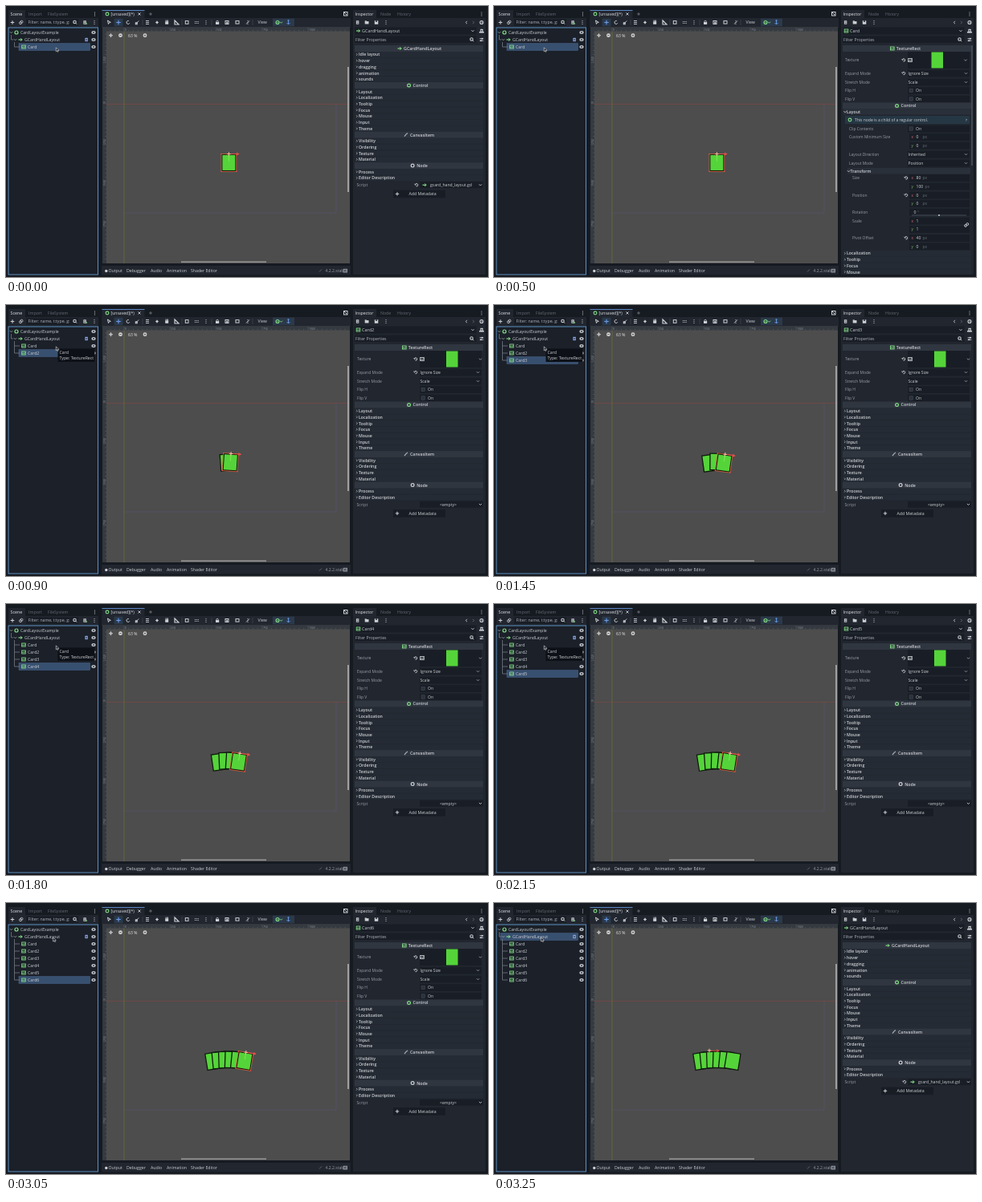
An HTML page with a canvas for the animation above (3.3 s loop, 600 by 338 pixels).

```html
<!DOCTYPE html>
<html lang="en">
<head>
<meta charset="utf-8">
<style>
html, body { margin: 0; width: 100%; height: 100%; overflow: hidden; background: #171b22; }
canvas { display: block; }
</style>
</head>
<body>
<canvas id="stage" width="600" height="338"></canvas>
<script>
const g = document.getElementById('stage').getContext('2d');
const LOOP = 3300;
const LIGHT = '#cdd0d4', DIM = '#9a9fa7', FAINT = '#666c76', GREEN = '#55d43a', LIME = '#83dc85',
      BLUE = '#699ce8', RED = '#f0504c', PANEL = '#21262f', FIELD = '#191e26', BAR = '#303640', SEL = '#385070';

function box(x, y, w, h, fill, stroke) {
  if (fill) { g.fillStyle = fill; g.fillRect(x, y, w, h); }
  if (stroke) { g.strokeStyle = stroke; g.strokeRect(x, y, w, h); }
}
function text(s, x, y, color = LIGHT, size = 5.2, weight = 400, align = 'left') {
  g.font = `${weight} ${size}px "Open Sans", "Noto Sans", sans-serif`;
  g.textAlign = align;
  g.textBaseline = 'alphabetic';
  g.fillStyle = color;
  g.fillText(s, x, y + 1.9);
}
function path(points, color, width = 0.9, closed) {
  g.beginPath();
  for (let i = 0; i < points.length; i += 2) g.lineTo(points[i], points[i + 1]);
  if (closed) g.closePath();
  g.strokeStyle = color; g.lineWidth = width; g.stroke(); g.lineWidth = 1;
}
function ring(x, y, r, color, width = 1.1) {
  g.beginPath(); g.arc(x, y, r, 0, 7);
  g.strokeStyle = color; g.lineWidth = width; g.stroke(); g.lineWidth = 1;
}
function dot(x, y, r, color) { g.beginPath(); g.arc(x, y, r, 0, 7); g.fillStyle = color; g.fill(); }
function plus(x, y, r, color, width = 1) {
  path([x - r, y, x + r, y], color, width);
  path([x, y - r, x, y + r], color, width);
}
const chevron = (x, y, c = LIGHT) => path([x - 1.6, y - .8, x, y + .8, x + 1.6, y - .8], c);
const more = (x, y, c = LIGHT) => path([x - .6, y - 1.2, x + .6, y, x - .6, y + 1.2], c, .7);
const cross = (x, y) => { path([x - 1.5, y - 1.5, x + 1.5, y + 1.5], LIGHT); path([x + 1.5, y - 1.5, x - 1.5, y + 1.5], LIGHT); };
const arrow = (x, y, c = LIME) => { path([x - 2.5, y, x + 2, y], c, 1.2); path([x, y - 1.6, x + 2.3, y, x, y + 1.6], c); };
const dots = (x, y, c = LIGHT) => [-2, 0, 2].forEach(d => dot(x, y + d, .6, c));
const revert = (x, y) => {
  g.beginPath(); g.arc(x, y, 1.7, -2.8, 1.8); g.strokeStyle = LIGHT; g.stroke();
  path([x - 2.5, y - 1.5, x - 1.5, y + .2, x, y - .6], LIGHT, .7);
};
function lens(x, y) { ring(x - .5, y - .5, 1.7, LIGHT); path([x + .7, y + .7, x + 2.3, y + 2.3], LIGHT); }
function eye(x, y) {
  g.beginPath(); g.ellipse(x, y, 2.7, 1.9, 0, 0, 7); g.fillStyle = '#c5c9cf'; g.fill();
  dot(x, y, 1, '#39414e');
}
function picture(x, y, c = LIME) {
  g.lineWidth = .9; box(x - 2.3, y - 2, 4.6, 4, null, c); g.lineWidth = 1;
  path([x - 2, y + 1.3, x - .5, y - .3, x + .5, y + .7, x + 2, y - .6], c, 1);
}
function sheet(x, y, c = LIGHT) { box(x - 1.6, y - 2.2, 3.4, 4.4, c); box(x - .7, y - 1, 1.7, .7, PANEL); box(x - .7, y + .5, 1.7, .7, PANEL); }
function folder(x, y) { box(x - 2.3, y - 1.4, 4.8, 3.4, LIGHT); box(x - 2.3, y - 2.1, 2.1, 1, LIGHT); }
function sliders(x, y) {
  path([x - 2.3, y - 1.3, x + 2.3, y - 1.3], LIGHT); path([x - 2.3, y + 1.3, x + 2.3, y + 1.3], LIGHT);
  dot(x + .8, y - 1.3, 1, LIGHT); dot(x - .8, y + 1.3, 1, LIGHT);
}

function sceneDock(state, t) {
  box(3, 15, 112, 320, PANEL);
  box(3, 5, 21, 10, PANEL);
  text('Scene', 5.5, 10, '#e6e7e9', 5.3);
  text('Import', 28, 10, FAINT, 5.3);
  text('FileSystem', 52, 10, FAINT, 5.1);
  dots(110.5, 10);
  plus(8, 20.5, 2.3, LIGHT);
  ring(18, 21.2, 1.5, LIGHT, .8); ring(19.5, 19.7, 1.5, LIGHT, .8);
  box(25, 16.5, 65, 8.5, FIELD);
  text('Filter: name, t:type, g:', 27.5, 20.5, '#b0b4bb', 5.2);
  lens(86, 20.5); sheet(98, 20.5); plus(100, 22, 1.2, LIME, .7); dots(110, 20.5);
  box(3, 27, 111.5, 308, '#1b2029', '#5d8fc0');
  const last = 42 + 9 * state.count;
  const selY = state.root ? 42 : 42 + 9 * state.selected, selX = state.root ? 8 : 16;
  g.lineWidth = .5; box(selX, selY - 4.3, 104.5 - selX, 8.6, SEL, '#4c6b92'); g.lineWidth = 1;
  chevron(6.5, 33, DIM); ring(13, 33, 2, LIME, 1.2);
  text('CardLayoutExample', 18, 33, LIGHT, 5.1); eye(109, 33);
  chevron(11.5, 42, DIM); arrow(18, 42);
  text('GCardHandLayout', 23, 42, LIGHT, 5.15); sheet(100, 42, '#8aa9e8'); eye(109, 42);
  path([6.5, 36, 6.5, 42, 9, 42], '#747a84', .8);
  path([10.5, 45, 10.5, last], '#747a84', .8);
  for (let i = 1; i <= state.count; i++) {
    const y = 42 + 9 * i;
    path([10.5, y, 17, y], '#747a84', .8);
    picture(22, y); text('Card' + (i > 1 ? i : ''), 27, y, LIGHT, 5.2); eye(109, y);
  }
  if (t > 740 && t < 2960) {
    box(64.5, 54.5, 46, 16.5, '#0d1117');
    text('Card', 66.5, 59, LIGHT, 5.2); text('Type: TextureRect', 66.5, 66, LIGHT, 5.2);
  }
}

function toolbar() {
  box(119, 15, 310, 12, PANEL); box(119.5, 5, 53, 10, PANEL);
  box(119.5, 5, 53, .8, BLUE);
  ring(126, 10, 1.9, LIME); text('[unsaved](*)', 130.5, 10, '#e0e2e5', 5.1);
  cross(166, 10); plus(180, 10, 1.9, FAINT);
  path([420.8, 7.8, 424.6, 11.6], LIGHT); box(420.5, 7.5, 4.5, 4.5, null, LIGHT);
  box(134.5, 15.7, 11, 9.6, '#2b394a'); box(332, 15.7, 27, 9.6, '#2b394a');
  path([126.5, 18, 127.5, 22.5, 128.5, 20.8, 130.3, 20.4], LIGHT, 1, true);
  plus(140, 20.5, 2.8, BLUE, 1.1);
  g.beginPath(); g.arc(152, 20.5, 2, .4, 5.2); g.strokeStyle = LIGHT; g.stroke();
  path([161.5, 22.3, 165.3, 18.5], LIGHT); box(161.3, 20.8, 2, 2, null, LIGHT);
  path([170, 17, 170, 24], '#3b414b');
  for (let d = -2; d <= 2; d += 2) path([174, 20.5 + d, 178, 20.5 + d], LIGHT);
  plus(188, 20.5, 2, LIGHT, .8); ring(188, 20.5, .8, LIGHT);
  box(198.2, 19.5, 4, 3.3, LIGHT); for (let i = 0; i < 3; i++) path([199 + i * 1.3, 20, 199 + i * 1.3, 17.5], LIGHT, .8);
  path([210, 18, 210, 23, 215, 23], LIGHT, 1.2, true);
  path([219, 17, 219, 24], '#3b414b');
  box(223.3, 18.6, 3.7, 3.7, null, LIGHT);
  for (let i = 0; i < 6; i++) dot(235.5 + i % 3 * 1.9, 19.5 + (i / 3 | 0) * 2, .6, LIGHT);
  dots(249, 20.5);
  path([256, 17, 256, 24], '#3b414b');
  box(261, 20, 4.2, 3, LIGHT); ring(263.1, 19.6, 1.3, LIGHT, .8);
  box(273, 18.5, 4, 4, null, LIGHT); box(274.2, 19.8, 2, 2, LIGHT);
  box(286, 18.6, 4, 3.5, null, LIGHT); dots(301, 20.5); path([299, 22.5, 303, 18.5], LIGHT);
  path([307, 17, 307, 24], '#3b414b');
  text('View', 313.5, 20.5, LIGHT, 5.2);
  ring(338, 20.5, 2, LIME); dot(338, 20.5, .7, LIME); chevron(342.5, 20.5, LIME);
  path([351.5, 18, 351.5, 23], BLUE); path([349.5, 21, 351.5, 23, 353.5, 21], BLUE); ring(351.5, 18.2, .8, BLUE, .7);
}

// Fan spacing and tilt of the outermost card, by hand size
const SPACING = [0, 0, 10.8, 10.4, 9.6, 9, 8.5], TILT = [0, 0, 8, 8, 8.5, 9, 9.3];
function pose(i, n) {
  if (n < 2) return [0, 0, 0];
  const mid = (n - 1) / 2, u = (i - mid) / mid;
  return [(i - mid) * SPACING[n], u * u * 1.7, u * TILT[n]];
}
function cards(state) {
  const p = Math.min(1, state.age / 250), e = 1 - (1 - p) * (1 - p), n = state.count;
  for (let i = 0; i < n; i++) {
    const to = pose(i, n), from = n > 1 ? pose(Math.min(i, n - 2), n - 1) : to;
    const [dx, dy, a] = to.map((v, k) => from[k] + (v - from[k]) * e);
    g.save();
    g.translate(277.4 + dx, 184.6 + dy); g.rotate(a * Math.PI / 180);
    g.lineWidth = 1.3;
    box(-8.6, .6, 17.2, 20.4, GREEN, '#101a0e');
    if (!state.root && i === n - 1) {
      g.lineWidth = .7; box(-9.4, -.2, 18.8, 22, null, '#e8623f');
      g.lineWidth = 1;
      for (const [x, y] of [[-9.4, 0], [9.4, 0], [9.4, 21.6], [-9.4, 21.6]]) dot(x, y, .7, RED);
      path([0, 0, 9, 0], RED, .8); path([0, 0, 0, 9], '#8cec5c', .7);
      path([9.5, -1.4, 12, 0, 9.5, 1.4], RED, 1.2);
      plus(0, 0, 2.4, '#ffc4ae', .9);
    }
    g.restore();
  }
  if (state.root) {
    path([268, 184.3, 277, 184.3], RED, .8); path([277, 183, 279.5, 184.3, 277, 185.6], RED, 1.2);
    plus(268, 184, 2.3, '#ffc4ae', .9);
  }
}

function viewport(state) {
  box(120, 26.5, 308, 294.5, '#4d4d4d');
  path([147, 258, 411, 258, 411, 122], '#57556d', .7);
  path([125, 122.5, 428, 122.5], '#754846', .8);
  path([147, 31, 147, 321], '#66703f', .8);
  box(120, 26.5, 308, 5, '#353a41'); box(120, 26.5, 5, 294.5, '#353a41');
  for (let i = 0; i < 60; i++) {
    const x = 129.8 + i * 5.73, y = 35 + i * 5.1;
    if (x < 427) path([x, i % 10 === 3 ? 27 : 29.8, x, 31.5], '#626870', .5);
    if (y < 320) path([i % 10 === 7 ? 120.5 : 123.3, y, 125, y], '#626870', .5);
  }
  [0, 250, 500, 750, 1000].forEach((v, i) => text(v, 148 + i * 57.3, 28.7, '#8c9299', 3.4));
  for (let i = -1; i < 4; i++) {
    g.save(); g.translate(122.3, 121 + i * 51); g.rotate(-Math.PI / 2);
    text(i * 250, 0, 0, '#8c9299', 3.4); g.restore();
  }
  plus(130.5, 36.7, 2.5, LIGHT, .8); ring(130.5, 36.7, 1.4, LIGHT, .6);
  dot(142.5, 36.7, 2.4, '#dcdcdc'); path([141.2, 36.7, 143.8, 36.7], '#4d4d4d');
  text('63 %', 152, 36.7, '#e5e5e5', 5.1);
  dot(173, 36.7, 2.4, '#dcdcdc'); plus(173, 36.7, 1.3, '#4d4d4d', .8);
  cards(state);
  box(425, 76, 2, 156, '#a0a0a0'); box(218, 318.3, 106, 1.8, '#8e8e8e');
}

function bottomBar() {
  box(119, 324, 310, 11.5, PANEL);
  dot(124.8, 330.5, 1.7, LIGHT);
  [['Output', 127.5], ['Debugger', 150], ['Audio', 180], ['Animation', 200], ['Shader Editor', 230]]
    .forEach(([s, x]) => text(s, x, 330.5, LIGHT, 5.2));
  path([390, 331.5, 393, 328.5], FAINT);
  text('4.2.2.stable', 397.5, 330.5, DIM, 5.1);
  box(420.2, 328.3, 4.2, 3.7, null, DIM);
}

function header(s, y, color, custom) {
  box(434, y - 4, 160, 8, BAR);
  const x = s === 'GCardHandLayout' ? 518.5 : s === 'CanvasItem' || s === 'Node' ? 518 : 516;
  text(s, x, y, LIGHT, 5.3, 600, 'center');
  const ix = x - g.measureText(s).width / 2 - 5;
  if (custom === 'arrow') arrow(ix, y);
  else if (custom === 'picture') picture(ix, y);
  else if (s === 'CanvasItem') path([ix - 2, y + 2, ix, y - .5, ix + 2, y - 2], color, 1.2);
  else ring(ix, y, 1.9, color, 1.2);
}
// Lists collapsed section names and returns the next free y
function sections(names, y) {
  for (const s of names) {
    box(435, y - 3.5, 159, 7, '#252b34');
    more(436.8, y); text(s, 439, y, LIGHT, 5.2, 600);
    y += 7.7;
  }
  return y;
}
const CONTROL = ['Layout', 'Localization', 'Tooltip', 'Focus', 'Mouse', 'Input', 'Theme'];
function lowerSections(y, script) {
  header('Control', y, LIME);
  y = sections(CONTROL, y + 7.7);
  header('CanvasItem', y, '#a9b0bb');
  y = sections(['Visibility', 'Ordering', 'Texture', 'Material'], y + 7.7);
  header('Node', y, LIGHT);
  y = sections(['Process', 'Editor Description'], y + 7.7) + 1;
  text('Script', 436.5, y, DIM);
  box(515, y - 4, 79, 8, FIELD);
  if (script) {
    revert(511, y); arrow(521, y); text('gcard_hand_layout.gd', 528, y, LIGHT, 5.1);
  } else text('<empty>', 540, y, LIGHT, 5.1);
  chevron(590.5, y);
  box(482, y + 6.5, 65, 9.5, '#181d25');
  plus(487, y + 11.2, 2.2, LIGHT); text('Add Metadata', 501.5, y + 11.2, LIGHT, 5.2);
}
function field(label, y, value, kind) {
  text(label, 437, y, DIM, 4.95);
  box(515, y - 4.3, 77, 8.8, FIELD);
  if (kind === 'check') {
    g.lineWidth = .5; box(517, y - 2.2, 4.4, 4.4, '#2c323c', '#464d58'); g.lineWidth = 1;
    text('On', 525, y, LIGHT, 5);
  } else {
    text(value, 515.5, y, LIGHT, 5);
    if (kind === 'menu') chevron(587.5, y, DIM);
  }
}
function vector(label, y, a, b, unit, changed) {
  text(label, 446 - (label[0] === 'C' ? 4 : 0), y, DIM, 4.9);
  [['x', a, '#d66d70'], ['y', b, '#7fbf6a']].forEach(([axis, v, c], i) => {
    const yy = y + i * 10.5;
    box(517, yy - 4.3, 75, 8.8, FIELD);
    text(axis, 519.5, yy, c, 4.6); text(v, 525.5, yy, LIGHT, 5.1);
    text(unit, 533.5 + (v > 99 ? 3 : 0), yy, FAINT, 4.9);
  });
  if (changed) revert(513, y);
}
function textureFields(big) {
  header('TextureRect', 53, LIME, 'picture');
  text('Texture', 437, 67.5, DIM, 5);
  box(515, 57, 77, 21, FIELD); revert(510, 67.5); picture(518, 67.5, LIGHT);
  box(big ? 544.5 : 548, 57.5, 14.5, 20, GREEN); chevron(big ? 587 : 590.5, 67.5, DIM);
  field('Expand Mode', 84, 'Ignore Size', 'menu'); revert(510, 84);
  field('Stretch Mode', 95, 'Scale', 'menu');
  field('Flip H', 105.5, '', 'check'); field('Flip V', 116, '', 'check');
}
function expandedLayout() {
  header('Control', 124.5, LIME);
  box(435, 128.5, 158, 7, '#2a303a');
  chevron(437, 132); text('Layout', 439, 132, LIGHT, 5.2, 600);
  box(437, 137, 155, 10, '#263744');
  ring(443, 142, 1.9, LIME); text('This node is a child of a regular control.', 449, 142, LIGHT, 5);
  more(588, 142);
  field('', 153, '', 'check'); text('Clip Contents', 442, 153, DIM, 4.9);
  vector('Custom Minimum Size', 163.5, 0, 0, 'px');
  field('', 185, 'Inherited', 'menu'); text('Layout Direction', 442, 185, DIM, 4.9);
  field('', 196, 'Position', 'menu'); text('Layout Mode', 442, 196, DIM, 4.9);
  box(440, 202, 153, 7.5, '#2a303a');
  chevron(441.5, 206); text('Transform', 443.5, 206, LIGHT, 5.2, 600);
  vector('Size', 214.5, 80, 100, 'px', true);
  vector('Position', 236, 0, 0, 'px', true);
  text('Rotation', 446, 257, DIM, 4.9);
  box(517, 252.7, 75, 8.8, FIELD); text('0', 522.5, 257); text('°', 527, 257, FAINT);
  path([520, 261, 588, 261], '#515863', .8); dot(554, 261, 1, LIGHT);
  vector('Scale', 268, 1, 1, '');
  ring(587, 274, 1.4, LIGHT, .9); ring(589.3, 272, 1.4, LIGHT, .9);
  vector('Pivot Offset', 289.3, 40, 0, 'px', true);
  sections(CONTROL.slice(1, 5), 308.5);
}
function inspector(state) {
  box(432, 15, 165, 320, PANEL); box(432, 5, 29, 10, PANEL);
  text('Inspector', 434.5, 10, '#e6e7e9', 5.2);
  text('Node', 466, 10, FAINT, 5.2); text('History', 487, 10, FAINT, 5.1); dots(592, 10);
  sheet(437.5, 20.5); folder(449, 20.5);
  box(458.8, 18.3, 4.5, 4.5, LIGHT); box(460, 18.3, 2, 1.5, PANEL); dots(473, 20.5);
  path([574, 18.8, 572.3, 20.5, 574, 22.2], LIGHT); path([581, 18.8, 582.7, 20.5, 581, 22.2], FAINT);
  ring(592, 20.5, 2, LIGHT); path([592, 19.2, 592, 20.6, 593, 20.6], LIGHT, .7);
  box(434, 26.5, 151.5, 9, FIELD);
  const asLayout = state.view === 'hand';
  if (asLayout) arrow(438.5, 31); else picture(438.5, 31);
  text(asLayout ? 'GCardHandLayout' : 'Card' + (state.selected > 1 ? state.selected : ''), 443, 31, LIGHT, 5.5);
  chevron(581, 31); sheet(592, 31); box(589, 32, 6, 1.5, LIGHT);
  box(434, 37.5, 151.5, 8.5, FIELD); text('Filter Properties', 435, 42, '#b0b4bb', 5.2);
  lens(580, 42); sliders(592, 42);
  g.save(); g.beginPath(); g.rect(432, 47, 165, 288); g.clip();
  if (asLayout) {
    header('GCardHandLayout', 53, LIME, 'arrow');
    sections(['Idle layout', 'hover', 'dragging', 'animation', 'sounds'], 60.5);
    lowerSections(99, true);
  } else {
    const open = state.selected === 1;
    textureFields(open);
    if (open) { expandedLayout(); box(594.3, 49, 1.3, 150, '#555c67'); }
    else lowerSections(124.5, false);
  }
  g.restore();
}

function pointer(t) {
  const up = Math.min(1, Math.max(0, (t - 2620) / 130)), away = Math.min(1, Math.max(0, (t - 2850) / 180));
  const x = 62.3 - 3.6 * away, y = 51.8 - 3.5 * up - 5.3 * away;
  g.beginPath();
  for (const [a, b] of [[0, 0], [0, 5], [1.2, 4], [2, 5.6], [2.8, 5.2], [2, 3.7], [3.6, 3.6]]) g.lineTo(x + a, y + b);
  g.closePath();
  g.fillStyle = '#10141a'; g.fill();
  g.strokeStyle = '#e8eaed'; g.lineWidth = .6; g.stroke(); g.lineWidth = 1;
}

const ADDED = [830, 1250, 1660, 2060, 2460], PICK_CARD = 100, PICK_HAND = 3060;
function stateAt(t) {
  const added = ADDED.filter(a => a <= t), count = 1 + added.length;
  const root = t >= PICK_HAND;
  return { count, selected: count, root, view: root || t < PICK_CARD ? 'hand' : 'card',
           age: added.length ? t - added[added.length - 1] : 1000 };
}

function draw() {
  const t = performance.now() % LOOP, state = stateAt(t);
  box(0, 0, 600, 338, '#161a21');
  toolbar();
  viewport(state);
  bottomBar();
  sceneDock(state, t);
  inspector(state);
  pointer(t);
  requestAnimationFrame(draw);
}
draw();
</script>
</body>
</html>
```
